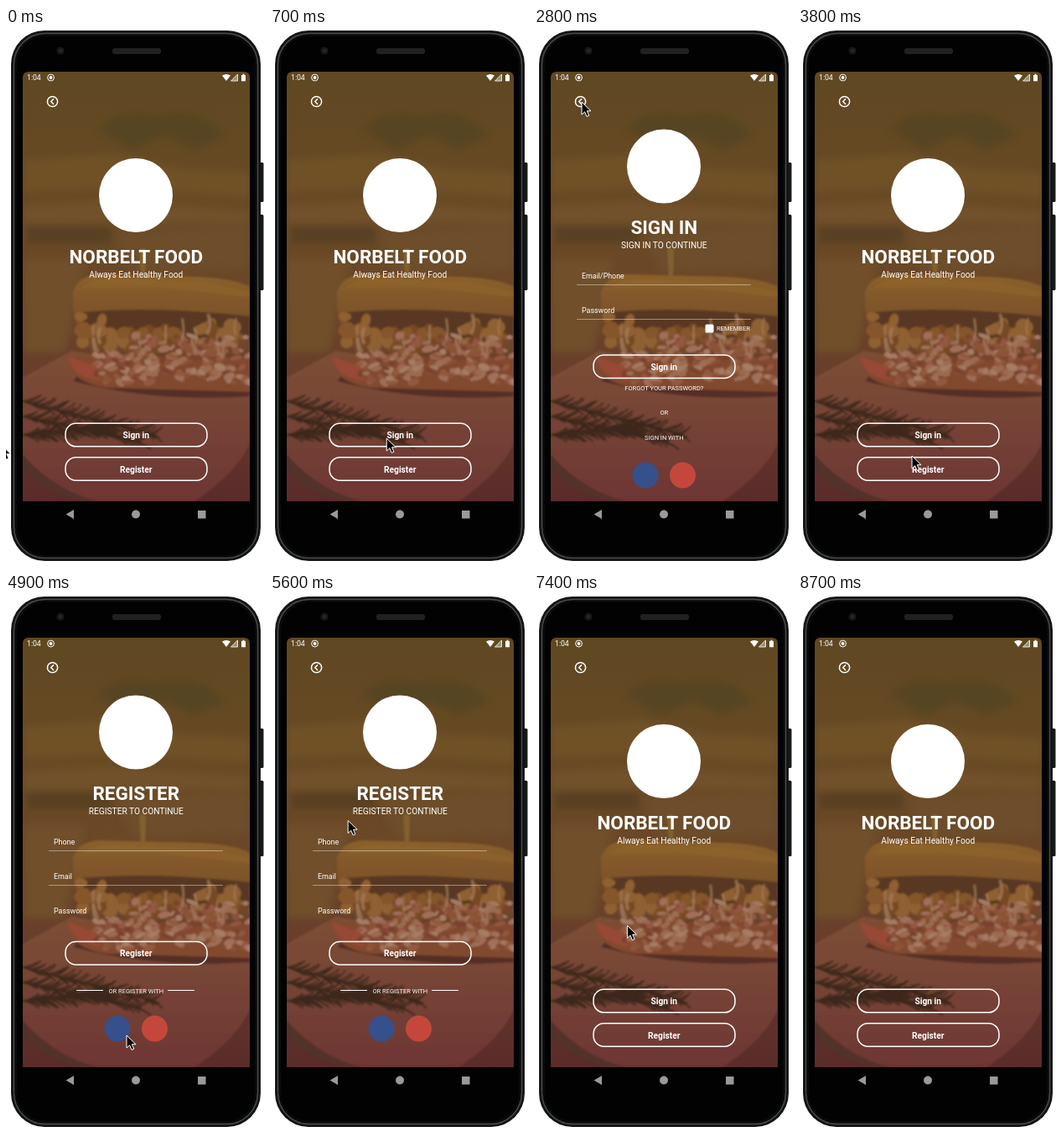
These frames come from a looping animation (308 px wide and 640 px high, 8800 ms). An HTML page:

```html
<!DOCTYPE html>
<html lang="en">
<head>
<meta charset="utf-8">
<title>Food app sign in</title>
<style>
  html, body { margin: 0; width: 100%; height: 100%; overflow: hidden; background: #fff; }
  svg { display: block; width: 308px; height: 640px; }
  text { font-family: Roboto, sans-serif; fill: #fff; }
  .mid { text-anchor: middle; }
  .title { font-size: 22.5px; font-weight: 700; }
  .sub { font-size: 10.2px; }
  .field { font-size: 8.9px; }
  .small { font-size: 7.5px; }
  .label { font-size: 10.2px; font-weight: 700; }
  .line { stroke: #fff; stroke-opacity: .42; }
  .btn { fill: none; stroke: #fff; stroke-width: 1.5; }
</style>
</head>
<body>
<svg viewBox="0 0 308 640" xmlns="http://www.w3.org/2000/svg">
  <defs>
    <linearGradient id="tint" x2="0" y2="1">
      <stop offset="0" stop-color="#5f4822"/>
      <stop offset=".3" stop-color="#694a24"/>
      <stop offset=".5" stop-color="#6b4727"/>
      <stop offset=".75" stop-color="#683c2c"/>
      <stop offset="1" stop-color="#5a2b2a"/>
    </linearGradient>
    <linearGradient id="bun" x2="0" y2="1">
      <stop offset="0" stop-color="#8a602c"/>
      <stop offset=".5" stop-color="#7d532b"/>
      <stop offset="1" stop-color="#6a432a"/>
    </linearGradient>
    <linearGradient id="board" x2="0" y2="1">
      <stop offset="0" stop-color="#7d4f36"/>
      <stop offset="1" stop-color="#6e3635"/>
    </linearGradient>
    <filter id="far" x="-30%" y="-30%" width="160%" height="160%"><feGaussianBlur stdDeviation="4"/></filter>
    <filter id="near" x="-10%" y="-10%" width="120%" height="120%"><feGaussianBlur stdDeviation=".8"/></filter>
    <clipPath id="screen"><path d="M20 563V59Q20 52 27 52H284Q291 52 291 59V563z"/></clipPath>
  </defs>

  <g id="phone">
    <rect x="302" y="160" width="5.500" height="47" rx="1.500" fill="#171918"/>
    <rect x="302" y="222" width="5.500" height="90" rx="1.500" fill="#171918"/>
    <rect x="6" y="3" width="298" height="631" rx="40" fill="#121413"/>
    <rect x="9.500" y="6.500" width="291" height="624" rx="37" fill="#080909" stroke="#474b4a" stroke-width="1.500"/>
    <rect x="13" y="10" width="284" height="617" rx="34" fill="#020202"/>
    <rect x="127" y="24" width="58" height="7" rx="3" fill="#202222"/>
    <circle cx="65" cy="27" r="4.500" fill="#17191a"/>
    <circle cx="65" cy="27" r="2" fill="#272a2c"/>
    <g fill="#9a9a9a">
      <path d="M71.500 578.500l9.500-5.500v11z"/>
      <circle cx="155" cy="578.500" r="5"/>
      <rect x="229" y="574" width="9.500" height="9.500"/>
    </g>
  </g>

  <g clip-path="url(#screen)">
    <rect x="20" y="52" width="271" height="511" fill="url(#tint)"/>
    <g filter="url(#far)">
      <path d="M110 120Q135 92 180 104 230 90 262 128L225 145 190 128 150 146z" fill="#574520"/>
      <path d="M20 158L130 150 210 168 291 172V200L130 190 20 194z" fill="#705127"/>
      <path d="M20 212L125 206 291 218V232L20 232z" fill="#715129"/>
      <path d="M25 236H125V256H25z" fill="#583f21"/>
      <path d="M130 242L291 236V285L150 290z" fill="#6d4d29"/>
      <path d="M20 275H95L70 385H20z" fill="#705029"/>
    </g>
    <g filter="url(#near)">
      <path d="M20 416L78 384 291 420V494Q275 530 225 563H110Q60 552 20 508z" fill="url(#board)"/>
      <path d="M20 508Q60 552 110 563H92Q45 555 20 526z" fill="#52302b"/>
      <path d="M80 420Q180 446 291 438V428L90 408z" fill="#542e25"/>
      <path d="M159 264Q163 259 167 264L166 296H161z" fill="#82602f"/>
      <path d="M80 314Q86 294 112 293L232 296Q275 299 291 308V388H105Q77 358 80 314z" fill="url(#bun)"/>
      <path d="M90 309Q104 298 128 298L240 303 291 314V320L180 308z" fill="#94682f" opacity=".5"/>
      <path d="M90 338Q180 330 291 343V372H92z" fill="#593820"/>
      <path d="M75 391Q74 421 120 428L291 433V392z" fill="#81492f"/>
      <path d="M75 391Q75 413 113 420L109 404z" fill="#984935"/>
      <g id="filling"></g>
      <g id="herbs" fill="none" stroke="#3d291d" stroke-linecap="round"></g>
    </g>

    <g id="home"></g>
    <g id="signIn"></g>
    <g id="register"></g>

    <g id="status" fill="#fff">
      <text x="25" y="62.300" font-size="8.700">1:04</text>
      <circle cx="53.500" cy="59" r="3.900" fill="none" stroke="#fff"/>
      <circle cx="53.500" cy="59" r="1.900"/>
      <path d="M258 56.500Q263 53.500 268 56.500L263 63z"/>
      <path d="M276.500 55V63H268.500z" fill-opacity=".4"/>
      <path d="M276.500 55V63H268.500z" fill="none" stroke="#fff" stroke-width=".8"/>
      <path d="M281 56h1.500v-1.200h2V56H286v7.200h-5z"/>
    </g>
    <g fill="none" stroke="#fff" stroke-width="1.500">
      <circle cx="55.500" cy="87.500" r="6.100"/>
      <path d="M57 84.300L53.700 87.500 57 90.700"/>
    </g>
  </g>
  <path id="cursor" d="M0 0V15L3.600 11.700 6 17.300 8.700 16.200 6.300 10.700H11z" fill="#000" stroke="#fff" stroke-width="1" stroke-linejoin="round"/>
</svg>

<script>
const LOOP = 8800, CX = 155.3, FADE = 250;
const $ = id => document.getElementById(id);

// Page parts
const text = (cls, x, y, s) => `<text class="${cls}" x="${x}" y="${y}">${s}</text>`;
const mid = (cls, y, s) => text(cls + ' mid', CX, y, s);
const line = (x1, x2, y) => `<path class="line" d="M${x1} ${y}H${x2}"/>`;
const disc = (x, y, r, fill) => `<circle cx="${x}" cy="${y}" r="${r}" fill="${fill}"/>`;
const button = (y, s) =>
  `<rect class="btn" x="71" y="${y}" width="169" height="27.500" rx="12.500"/>` + mid('label', y + 17.8, s);
const socials = y => disc(133, y, 15.5, '#36508c') + disc(177.5, y, 15.5, '#c5473b');
const header = (title, sub) => disc(155, 164.5, 44, '#fff') + mid('title', 245, title) + mid('sub', 262, sub);
const fields = names => names.map((s, i) =>
  text('field', 57, 298 + i * 41, s) + (i < 2 ? line(51, 259, 305.5 + i * 41) : '')).join('');

$('home').innerHTML = disc(155, 199, 44, '#fff') + mid('title', 279.5, 'NORBELT FOOD') +
  mid('sub', 297, 'Always Eat Healthy Food') + button(470.3, 'Sign in') + button(510.7, 'Register');

$('signIn').innerHTML = header('SIGN IN', 'SIGN IN TO CONTINUE') + fields(['Email/Phone', 'Password']) +
  '<rect x="204.500" y="352.500" width="10" height="10" rx="1.500" fill="#fff"/>' +
  text('small', 218, 360, 'REMEMBER') + button(389, 'Sign in') +
  mid('small', 431, 'FORGOT YOUR PASSWORD?') + mid('small', 460, 'OR') +
  mid('small', 489.5, 'SIGN IN WITH') + socials(532);

$('register').innerHTML = header('REGISTER', 'REGISTER TO CONTINUE') +
  fields(['Phone', 'Email', 'Password']) + button(413.5, 'Register') +
  '<path d="M84 471.500H116M193 471.500H225" stroke="#fff"/>' +
  mid('small', 474.5, 'OR REGISTER WITH') + socials(517);

// Backdrop details
let seed = 11;
const rnd = () => (seed = seed * 16807 % 2147483647) / 2147483647;
const between = (a, b) => a + (b - a) * rnd();

function drawFilling() {
  const crumbs = ['#85562a', '#774923', '#8f6032'];
  const meat = ['#9b6a50', '#8a5238', '#a67b64', '#93593f', '#7a422f', '#a0705a'];
  let out = '';
  const blob = (x, y, rx, ry, fill) => {
    out += `<ellipse cx="${x}" cy="${y}" rx="${rx}" ry="${ry}" fill="${fill}" transform="rotate(${between(-40, 40)} ${x} ${y})"/>`;
  };
  for (let i = 0; i < 60; i++) {
    const x = between(88, 285);
    blob(x, between(x < 150 ? 343 : 352, 382), between(5, 11), between(5, 9), crumbs[i % 3]);
  }
  for (let i = 0; i < 190; i++) {
    const x = between(103, 291);
    blob(x, between(x < 150 ? 384 : 366, 422), between(3, 8), between(2, 4.5), meat[i % 6]);
  }
  for (let i = 0; i < 12; i++) {
    const x = between(100, 280), y = between(340, 372);
    out += `<path d="M${x} ${y}q${between(-6, 6)} ${between(8, 16)} ${between(-3, 6)} ${between(18, 32)}" fill="none" stroke="#a58062" stroke-opacity=".7" stroke-width="${between(1.5, 4)}"/>`;
  }
  $('filling').innerHTML = out;
}

function drawHerbs() {
  const stems = [[20, 444, 178, 484], [20, 462, 160, 492], [20, 484, 125, 476]];
  let out = '';
  for (const [x1, y1, x2, y2] of stems) {
    out += `<path d="M${x1} ${y1}L${x2} ${y2}" stroke-width="2"/>`;
    for (let u = 0; u < 1; u += .028) {
      const x = x1 + (x2 - x1) * u, y = y1 + (y2 - y1) * u;
      const len = between(11, 21), bend = between(4, 11);
      out += `<path d="M${x} ${y}q${len * .6} ${-bend * .3} ${len} ${-bend}M${x} ${y}q${len * .6} ${bend * .5} ${len} ${bend}" stroke-width="1.700"/>`;
    }
  }
  $('herbs').innerHTML = out;
}
drawFilling();
drawHerbs();

// Motion
const clamp = v => Math.max(0, Math.min(1, v));
const easeOut = u => 1 - (1 - u) ** 3;
const smooth = u => u * u * (3 - 2 * u);
const visits = { signIn: [900, 3000], register: [4450, 6550] };
const path = [
  [0, -5.5, 496], [750, 141, 488], [1500, 141, 488], [2500, 57, 88], [3150, 57, 88], [3800, 136, 509],
  [4200, 144, 525], [5100, 144, 525], [6000, 57, 88], [6900, 57, 88], [7800, 150, 612]
];

function cursorAt(t) {
  const i = path.findIndex(k => k[0] > t);
  if (i < 0) return null;
  const [t0, x0, y0] = path[i - 1], [t1, x1, y1] = path[i];
  const u = smooth((t - t0) / (t1 - t0));
  return [x0 + (x1 - x0) * u, y0 + (y1 - y0) * u];
}

function render(t) {
  let shown = 0;
  for (const id in visits) {
    const [start, end] = visits[id];
    const u = easeOut(clamp((t - start) / FADE)) * (1 - easeOut(clamp((t - end) / FADE)));
    $(id).setAttribute('opacity', u);
    $(id).setAttribute('transform', `translate(0 ${40 * (1 - u)})`);
    shown = Math.max(shown, u);
  }
  $('home').setAttribute('opacity', 1 - shown);

  const p = cursorAt(t);
  $('cursor').setAttribute('visibility', p ? 'visible' : 'hidden');
  if (p) $('cursor').setAttribute('transform', `translate(${p[0]} ${p[1]})`);
}

const began = performance.now();
function tick() {
  render((performance.now() - began) % LOOP);
  requestAnimationFrame(tick);
}
tick();
</script>
</body>
</html>
```
